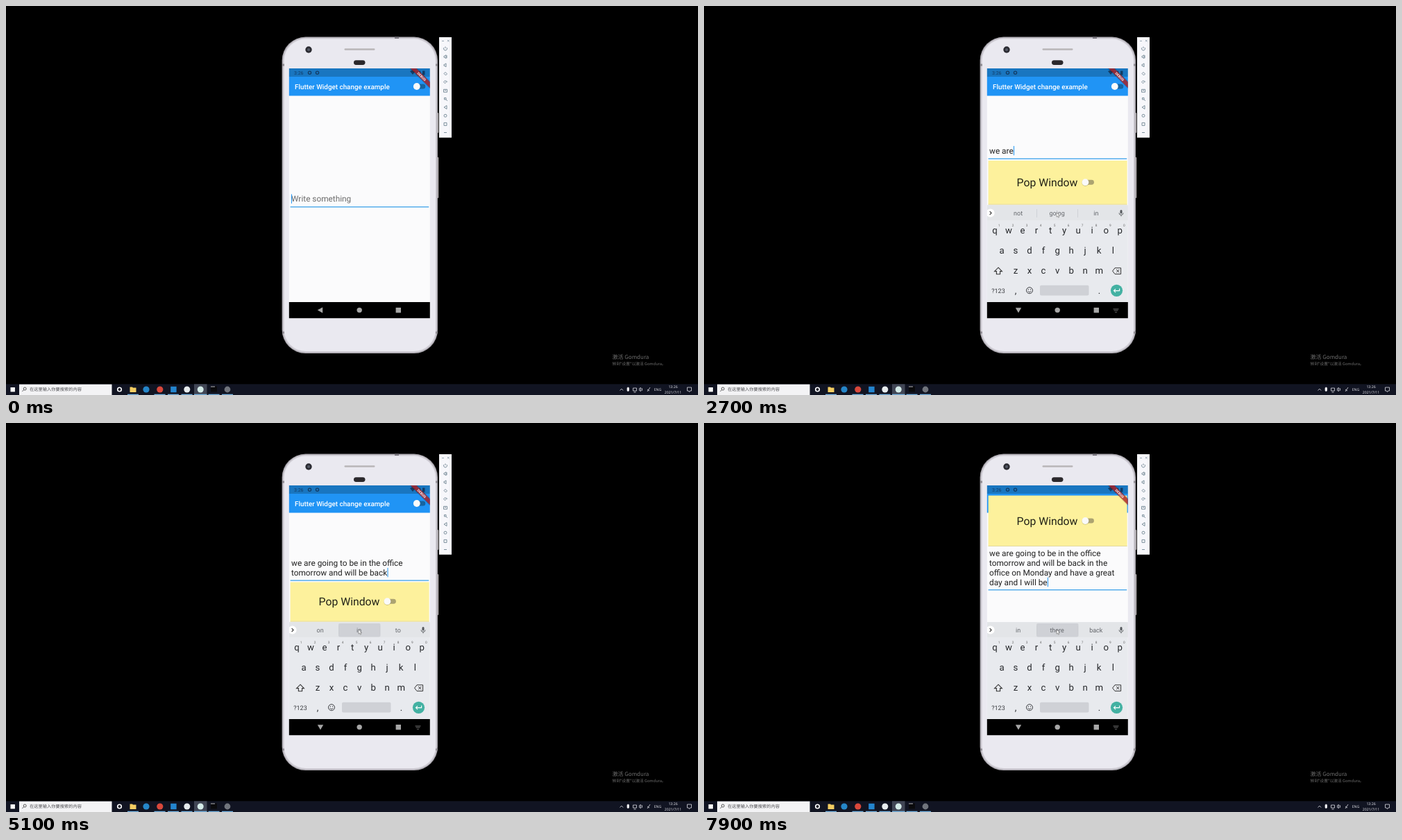
Recreate the animation shown at these times as an HTML page. Size 997 by 561 pixels, loop 8000 ms.

```html
<!DOCTYPE html>
<html lang="en">
<head>
<meta charset="utf-8">
<title>Widget change example</title>
<style>
html, body { margin: 0; width: 100%; height: 100%; overflow: hidden; background: #000; }
svg { display: block; width: 100vw; height: 100vh; font-family: Roboto, sans-serif; text-rendering: geometricPrecision; }
.cjk { font-family: "Noto Sans CJK SC", "Noto Sans CJK", sans-serif; }
.tray { font-family: "Open Sans", sans-serif; fill: #e8e8ee; font-size: 5.2px; }
.mid { text-anchor: middle; }
</style>
</head>
<body>
<svg id="stage" viewBox="0 0 997 561">
  <defs>
    <clipPath id="screen"><rect x="407.8" y="90" width="203" height="360.2"/></clipPath>
    <clipPath id="aboveNav"><rect x="407.8" y="90" width="203" height="337"/></clipPath>
  </defs>
  <rect width="997" height="561"/>

  <!-- phone body -->
  <rect x="620" y="154" width="3.2" height="29" rx="1" fill="#bdb9bb"/>
  <rect x="620" y="218" width="3.2" height="59" rx="1" fill="#bdb9bb"/>
  <rect x="397.6" y="44.6" width="224.4" height="456.4" rx="34" fill="#a5a2a9"/>
  <rect x="398.8" y="45.8" width="222" height="454" rx="33" fill="#cfccd4"/>
  <rect x="400.6" y="47.6" width="218.4" height="450.4" rx="31.500" fill="#eae9f0"/>
  <path d="M398 85h3M619 85h3M398 471h3M619 471h3" stroke="#8f8c92" stroke-width="3"/>
  <rect x="560" y="44.5" width="6" height="2.5" fill="#77747c"/>
  <circle cx="436" cy="63" r="4.7" fill="#2b2b32"/><circle cx="436" cy="63" r="2" fill="#555a66"/>
  <rect x="487.5" y="61.200" width="44" height="2.600" rx="1.3" fill="#b9b6b8"/>
  <rect x="501" y="78.200" width="16.5" height="6.800" rx="3.4" fill="#2b282c"/>

  <!-- emulator toolbar -->
  <rect x="624" y="45" width="18" height="144.8" fill="#f7f7fb"/>
  <g id="tools" fill="none" stroke="#5f7686" stroke-width=".8"></g>

  <g clip-path="url(#screen)">
    <rect x="407" y="90" width="205" height="361" fill="#fbfbfc"/>
    <rect x="407" y="102" width="205" height="27.5" fill="#2094f5"/>
    <rect x="407" y="90" width="205" height="12" fill="#1976c0"/>
    <text x="416" y="119.6" font-size="9.85" font-weight="500" fill="#fff">Flutter Widget change example</text>
    <rect x="588" y="112.5" width="16.3" height="7" rx="3.5" fill="#17649f"/>
    <circle cx="591.8" cy="116" r="4.9" fill="#fafafa"/>

    <g fill="#123c66">
      <text x="415" y="98.8" font-size="7">3:26</text>
      <circle cx="437.5" cy="96.2" r="2.1" fill="none" stroke="#123c66" stroke-width="1.3"/>
      <circle cx="448.5" cy="96.2" r="2.1" fill="none" stroke="#123c66" stroke-width="1.3"/>
      <path d="M582 94q4-3 8 0l-4 5zM591 99l6-6v6zM600 93.5h3.5v6h-3.5z"/>
    </g>

    <g id="field">
      <text id="hint" x="411" font-size="11.84" fill="#6c6c6c">Write something</text>
      <g id="lines" font-size="11.84" fill="#202020"></g>
      <rect id="caret" width="1" height="13.4" fill="#2196f3"/>
      <rect id="underline" x="409.6" width="199.6" height="1.2" fill="#2f9be8"/>
    </g>

    <g id="popup">
      <rect id="panel" x="409.6" width="200" fill="#fdf19c"/>
      <rect id="panelEdge" x="409.6" width="200" height=".8" fill="#ddd4a0"/>
      <g id="panelLabel">
        <text x="450.6" y="5.5" font-size="15.78" fill="#222218">Pop Window</text>
        <rect x="545.6" y="-3.4" width="16.3" height="6.9" rx="3.4" fill="#aca370"/>
        <circle cx="549.4" cy=".7" r="5" fill="#000" opacity=".18"/>
        <circle cx="549.4" r="4.9" fill="#fafafa"/>
      </g>
    </g>

    <g transform="translate(610.7 90) rotate(45)">
      <rect x="-25" y="12.800" width="50" height="7.900" opacity=".18"/>
      <rect x="-25" y="13.8" width="50" height="5.9" fill="#b71c1c" opacity=".75"/>
      <text class="mid" y="18.5" font-size="5" font-weight="900" fill="#fff" opacity=".85">DEBUG</text>
    </g>

    <g clip-path="url(#aboveNav)"><g id="keyboard">
      <rect x="407" y="287" width="205" height="140" fill="#e8eaee"/>
      <rect x="407" y="287.5" width="205" height="21.5" fill="#e3e5e8"/>
      <rect id="press" x="479" y="289" width="60.5" height="19.5" rx="2" fill="#cfd1d6"/>
      <path d="M479.5 293v12M538.5 293v12" stroke="#cbcdd1" stroke-width=".8"/>
      <circle cx="412.6" cy="298.6" r="6" fill="#fff"/>
      <path d="M411.6 296.2l2.5 2.4-2.5 2.4" fill="none" stroke="#333" stroke-width="1.1"/>
      <rect x="599.5" y="294" width="3" height="5.6" rx="1.5" fill="#55585c"/>
      <path d="M598 298.4q0 3 3 3t3-3M601 301.4v2" fill="none" stroke="#55585c" stroke-width=".9"/>
      <g id="suggest" class="mid" font-size="9" fill="#63666b"></g>
      <g id="keys" class="mid" fill="#26282b"></g>
      <path d="M424 377.2l5.4 5.4h-2.8v4.2h-5.2v-4.2h-2.8z" fill="none" stroke="#333" stroke-width="1.1"/>
      <path d="M588.6 382.2l3.4-4.4h8.6v8.8H592zM594.2 380l4.2 4.4m0-4.4l-4.2 4.4" fill="none" stroke="#333" stroke-width="1"/>
      <text class="mid" x="424" y="413.6" font-size="9" fill="#3a3c40">?123</text>
      <circle cx="469" cy="410.2" r="4.5" fill="none" stroke="#3a3c40"/>
      <path d="M466.6 411.4q2.4 2.8 4.8 0M467.4 408v1.5M470.6 408v1.5" fill="none" stroke="#3a3c40" stroke-width=".9"/>
      <rect x="484" y="402.8" width="70.5" height="14.6" rx="2" fill="#cfd1d6"/>
      <circle cx="594.5" cy="410.3" r="8.6" fill="#43b1a2"/>
      <path d="M598.6 407.6v3h-8m2.4-2.5l-2.5 2.5 2.5 2.5" fill="none" stroke="#fff" stroke-width="1.1"/>
    </g></g>

    <rect x="407" y="427" width="205" height="24"/>
    <path id="back" fill="#a7a7a7"/>
    <circle cx="509.2" cy="438.6" r="3.7" fill="#a7a7a7"/>
    <rect x="561.6" y="435" width="7.4" height="7.4" fill="#a7a7a7"/>
    <path id="hideKeys" d="M589.5 437h8M590.5 439h6M592 441l1.5 1 1.5-1" fill="none" stroke="#777" stroke-width=".9"/>
  </g>

  <path id="pointer" d="M0 0v6.2l1.5-1.3 1 2.3 1.1-.5-1-2.2h2z" fill="#fff" stroke="#666" stroke-width=".6"/>

  <g class="cjk" fill="#6e6e6e">
    <text x="873.5" y="509" font-size="8">激活 Gomdura</text>
    <text x="873.5" y="517.6" font-size="5.7">转到"设置"以激活 Gomdura。</text>
  </g>

  <!-- taskbar -->
  <rect y="545.300" width="997" height="16" fill="#111422"/>
  <rect x="6.5" y="550" width="6.4" height="6.4" fill="#fff"/>
  <rect x="19" y="545.600" width="133.500" height="15.400" fill="#f3f3f5"/>
  <circle cx="27.2" cy="552" r="2" fill="none" stroke="#333" stroke-width=".8"/>
  <path d="M25.7 553.5l-2.3 2.4" stroke="#333" stroke-width=".8"/>
  <text class="cjk" x="34" y="555.3" font-size="6.25" fill="#4c4c50">在这里输入你要搜索的内容</text>
  <rect x="271" y="545.300" width="18.5" height="16" fill="#414655"/>
  <circle cx="163.5" cy="553" r="2.8" fill="none" stroke="#fff" stroke-width="1.6"/>
  <path d="M178.5 549.5h3.5l1 1h4.5v6.5h-9z" fill="#f3cd62"/>
  <circle cx="202" cy="553" r="4.6" fill="#2586c9"/>
  <circle cx="221.8" cy="553" r="4.6" fill="#d9483b"/>
  <rect x="237.2" y="548.8" width="8.4" height="8.4" fill="#2385cf"/>
  <circle cx="260.8" cy="553" r="4.5" fill="#e6ebed"/>
  <circle cx="280.2" cy="553" r="4.5" fill="#d4ebe8"/>
  <path d="M295 548.5h9v8h-9z" fill="#0a0a0c"/><path d="M295 549h6" stroke="#b5b5ba"/>
  <circle cx="319" cy="553" r="4.4" fill="#70747c"/>
  <path d="M175 560.4h16M213.5 560.4h16M233 560.4h16M252.5 560.4h16M271 560.4h18.5M291.5 560.4h16M311 560.4h16" stroke="#76b5e4" stroke-width="1.1"/>
  <g fill="none" stroke="#dcdce4" stroke-width=".8">
    <path d="M884.5 554.5l2.3-2.5 2.3 2.5M903.5 551h5v4h-5zM904.5 557h3M912.5 551.5l2-1v5l-2-1zM916 551q1.5 2 0 4M924 556l4-6M924 553l3 2M981.5 550h6v5h-2l-1 1.7-1-1.7h-2z"/>
    <rect x="895" y="550" width="2.5" height="5.5" rx="1.2" fill="#fff"/>
  </g>
  <g class="tray mid">
    <text x="939" y="555">ENG</text>
    <text x="961" y="551.4">13:26</text>
    <text x="961" y="558.6">2021/7/11</text>
  </g>
</svg>
<script>
const LOOP = 8000, STEP = 100, KEYS_OPEN = 1000;
const $ = id => document.getElementById(id);

function add(parent, tag, attrs, text) {
  const el = document.createElementNS("http://www.w3.org/2000/svg", tag);
  set(el, attrs);
  if (text) el.textContent = text;
  return parent.appendChild(el);
}
function set(el, attrs) {
  for (const name in attrs) el.setAttribute(name, attrs[name]);
}
const show = (el, on) => set(el, { visibility: on ? "visible" : "hidden" });
const ease = (t, from, to) => {
  const p = Math.min(1, Math.max(0, (t - from) / (to - from)));
  return p * p * (3 - 2 * p);
};

// Each entry is "word:suggestions"; a leading slash starts a new line.
const words = [];
function type(start, gap, script) {
  script.split(";").forEach((entry, i) => {
    const [word, options] = entry.split(":");
    words.push({ word, time: start + gap * i, options: options.split(",") });
  });
}
type(2200, 500, "we:have,are,will;are:not,going,in;going:out,to,on");
type(3500, 167, "to:the,be,get;be:a,in,there;in:my,the,a;the:morning,office,same;" +
  "office:and,tomorrow,today;/tomorrow:to,and,morning;and:I,will,then;" +
  "will:have,be,get;be:in,back,there;back:on,in,to");
type(5200, 200, "in:a,the,my;the:morning,office,next;/office:for,on,and;" +
  "on:the,Monday,Friday;Monday:you,and,the");
type(6200, 170, "and:I,have,will;have:to,a,the;a:good,great,nice;" +
  "great:weekend,day,time;/day:at,and,with;and:a,I,have");
type(7300, 220, "I:have,will,am;will:have,be,get;be:in,there,back");
const firstOptions = ["thanks", "I", "we"];

const lineEls = [0, 1, 2, 3].map(() => add($("lines"), "text", { x: 411 }));
const optionEls = [452.6, 508.6, 564.8].map(x => add($("suggest"), "text", { x, y: 302 }));

function keyRow(letters, x, y, attrs = { "font-size": 13.2 }) {
  [...letters].forEach((key, i) => add($("keys"), "text", { x: x + 20.03 * i, y, ...attrs }, key));
}
keyRow("qwertyuiop", 419, 328.2);
keyRow("asdfghjkl", 429, 357);
keyRow("zxcvbnm", 449, 386.2);
keyRow(",", 449, 414.5);
keyRow(".", 569.5, 414.5);
keyRow("1234567890", 425, 318, { "font-size": 4.8, fill: "#666" });

const toolShapes = ["M-2-1a2.5 2.5 0 1 0 4 0M0-2.5v2.5", "M-2-1h1l2-1.5v5l-2-1.5h-1zM2-2v4",
  "M-2-1h1l2-1.5v5l-2-1.5h-1z", "M-2 0l2-2 2.5 2.5-2 2z", "M-2.5 0l2-2 2 2-2 2zM1-2l2 2",
  "M-2.5-1.5h5v4h-5zM-1 0h2", "M-1.5-1.5h2.5v2.5h-2.5zM1 1l2 2", "M2-2.5v5l-4-2.5z",
  "M-2 0a2 2 0 1 0 4 0a2 2 0 1 0-4 0", "M-2-2h4v4h-4z", "M-2 0h4"];
toolShapes.forEach((d, i) =>
  add($("tools"), "path", { d, transform: `translate(633 ${61 + 12.15 * i})` }));
add($("tools"), "path", { d: "M628 50.5h3M636 49l2.5 2.5m0-2.5l-2.5 2.5", "stroke-width": .6 });

// Top, bottom and label height of the popup for each number of lines.
const panels = { 1: [223, 286.5, 254.2], 2: [229.5, 286.5, 257.2], 3: [104.6, 185, 144.6], 4: [104.6, 178, 141] };

function drawField(t, typed, open) {
  const lines = typed.map(w => w.word).join(" ").split(" /");
  const n = lines.length, empty = !typed.length;
  const drop = open ? 0 : 69.5;
  const base = 212.8 - 6.9 * (n - 1) + drop;
  lineEls.forEach((el, i) => {
    el.textContent = lines[i] || "";
    set(el, { y: base + 13.87 * i });
  });
  set($("hint"), { y: base });
  show($("hint"), empty);
  const last = lineEls[n - 1];
  set($("caret"), {
    x: 411 + (empty ? 0 : last.getComputedTextLength() + .3),
    y: base + 13.87 * (n - 1) - 10.9
  });
  show($("caret"), !empty || t % 1000 < 500);
  set($("underline"), { y: 219.7 + 6.8 * (n - 1) + drop });

  show($("popup"), !empty);
  const [top, bottom, middle] = panels[n];
  set($("panel"), { y: top, height: bottom - top });
  set($("panelEdge"), { y: bottom - .8 });
  set($("panelLabel"), { transform: `translate(0 ${middle})` });
}

function drawKeyboard(t, typed, open) {
  const slide = 140 * (1 - ease(t, KEYS_OPEN - 100, KEYS_OPEN + 200));
  show($("keyboard"), open);
  set($("keyboard"), { transform: `translate(0 ${slide})` });
  const options = typed.length ? typed[typed.length - 1].options : firstOptions;
  optionEls.forEach((el, i) => el.textContent = options[i]);
  const next = words[typed.length] ? words[typed.length].time : LOOP;
  set($("press"), {
    x: typed.length ? 479 : 539,
    opacity: t > 2000 && next - t <= 130 ? 1 : 0
  });
  set($("back"), { d: open ? "M448.8 435.2h8.4l-4.2 7.4z" : "M456.2 434.4v8.4l-7.4-4.2z" });
  show($("hideKeys"), open);
}

function drawPointer(t) {
  const enter = ease(t, 400, 900), toWe = ease(t, 1750, 2100), toMiddle = ease(t, 2250, 2550);
  const x = 520 - 53.5 * enter + 98 * toWe - 56.5 * toMiddle;
  const y = 340 - 66 * enter + 24 * toWe;
  set($("pointer"), { transform: `translate(${x} ${y})` });
  show($("pointer"), t >= 500);
}

function render(t) {
  const typed = words.filter(w => w.time <= t);
  const open = t >= KEYS_OPEN;
  drawField(t, typed, open);
  drawKeyboard(t, typed, open);
  drawPointer(t);
}

let start;
function tick(now) {
  start ??= now;
  render(Math.floor((now - start) % LOOP / STEP) * STEP);
  requestAnimationFrame(tick);
}
render(0);
requestAnimationFrame(tick);
</script>
</body>
</html>
```
